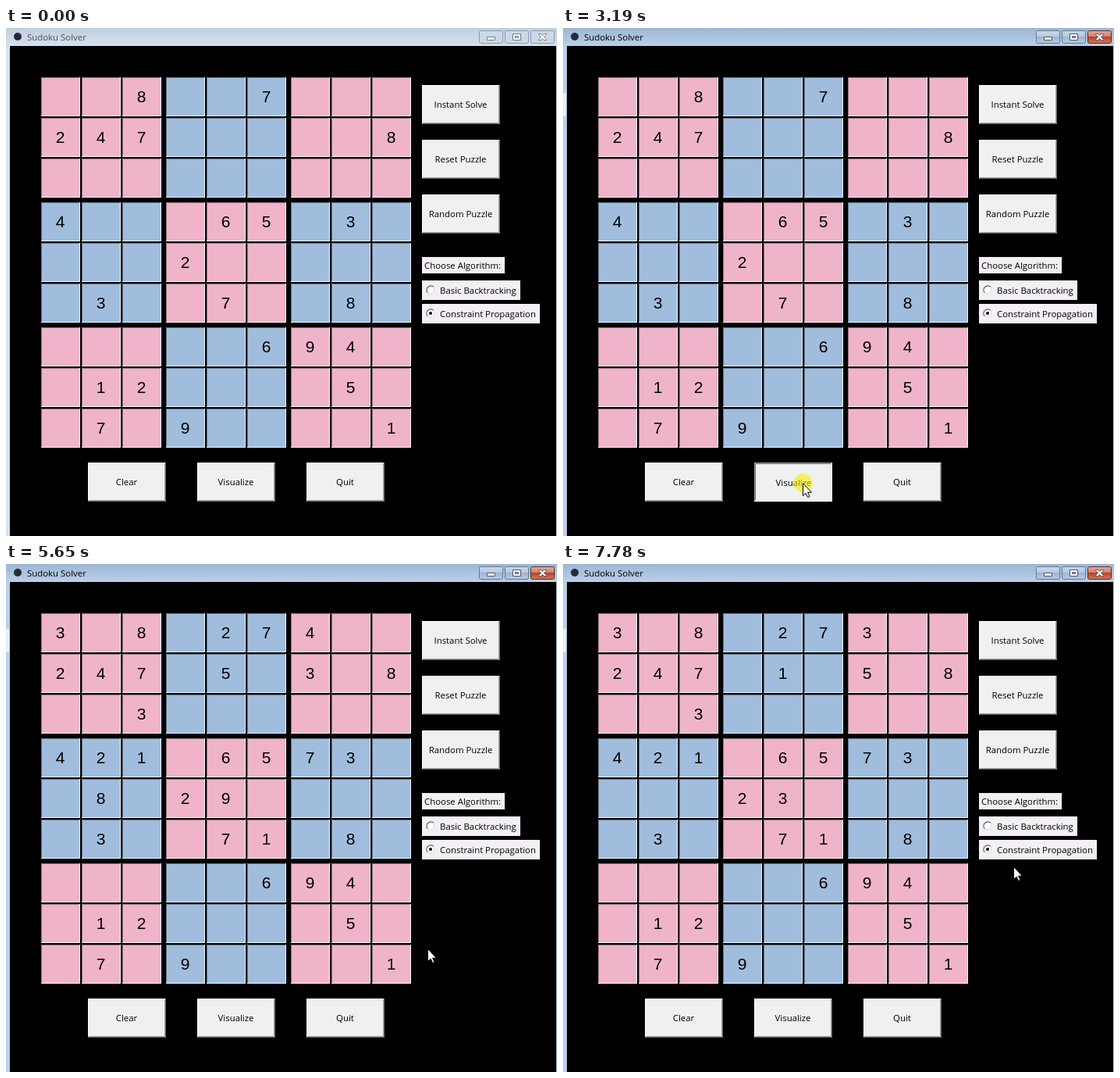
Animation of 706 by 650 pixels, one loop 8000 ms. Source, as an HTML page:

```html
<!DOCTYPE html>
<html lang="en">
<head>
<meta charset="utf-8">
<title>Sudoku Solver</title>
<style>
  html, body { margin: 0; width: 100%; height: 100%; overflow: hidden; background: #000; }
  svg { display: block; width: 706px; height: 650px; }
  text { font: 11.4px "Open Sans", "Noto Sans", sans-serif; }
  .digit { font: 21px "Liberation Sans", Arial, sans-serif; }
  .mid { text-anchor: middle; }
</style>
</head>
<body>
<svg id="stage" viewBox="0 0 706 650" xmlns="http://www.w3.org/2000/svg">
  <defs>
    <linearGradient id="idle" x2="0" y2="1">
      <stop stop-color="#c1cedb"/><stop offset="1" stop-color="#d5e1ee"/>
    </linearGradient>
    <linearGradient id="live" x2="0" y2="1">
      <stop stop-color="#9cb6d3"/><stop offset="1" stop-color="#b9d0e9"/>
    </linearGradient>
    <linearGradient id="glass" x2="0" y2="1">
      <stop stop-color="#c9d8ea"/><stop offset=".5" stop-color="#b4c8df"/>
      <stop offset=".5" stop-color="#9db5d1"/><stop offset="1" stop-color="#b5cbe4"/>
    </linearGradient>
    <linearGradient id="red" x2="0" y2="1">
      <stop stop-color="#e3aa9b"/><stop offset=".5" stop-color="#d07f69"/>
      <stop offset=".5" stop-color="#bb4227"/><stop offset="1" stop-color="#d0795c"/>
    </linearGradient>
  </defs>
</svg>
<script>
const LOOP = 8000, CLICK = 3190, RELEASE = 3270;
const PINK = ['#f0b4ca', '#906c79', '#fff6fc'];
const BLUE = ['#a1bddd', '#617185', '#e6f7ff'];
const FACE = '#f0f0f0', PANEL = '#f3eff5', SHADE = '#a0a0a0', DARK = '#696969';
const stage = document.getElementById('stage');

function add(tag, attrs, parent = stage) {
  const el = document.createElementNS('http://www.w3.org/2000/svg', tag);
  for (const k in attrs) el.setAttribute(k, attrs[k]);
  return parent.appendChild(el);
}
const rect = (x, y, width, height, fill, extra) =>
  add('rect', { x, y, width, height, fill, ...extra });
function label(x, y, str, cls = '') {
  const el = add('text', { x, y, class: cls });
  el.textContent = str;
  return el;
}
// One-pixel bevel: first colour on top and left, second on bottom and right.
function bevel(x, y, w, h, a, b, parent) {
  const edge = (d, stroke) => add('path', { d, stroke, fill: 'none' }, parent);
  edge(`M${x + .5} ${y + h}V${y + .5}H${x + w}`, a);
  edge(`M${x} ${y + h - .5}H${x + w - .5}V${y}`, b);
}

// Window frame
const frame = rect(0, 0, 706, 650);
const bar = rect(0, 0, 706, 23);
const tab = rect(0, 83, 4, 30, '#e6eff8');
rect(5, 23, 700, 627, '#000');
add('circle', { cx: 15, cy: 11, r: 5, fill: '#252b36' });
const title = label(27, 16, 'Sudoku Solver');
const boxes = [0, 1, 2].map(i => rect(606.5 + 33 * i, 3.5, 30, 16, 'none', { rx: 2 }));
const icons = [
  'M616.5 11.5h10v4h-10z',
  'M649.5 7.5h10v8h-10zM652.5 10.5h4v2h-4z',
  'M682.5 7.5h3l2 2 2-2h3v1l-3 3 3 3v1h-3l-2-2-2 2h-3v-1l3-3-3-3z'
].map(d => add('path', { d, fill: '#fff', 'fill-rule': 'evenodd' }));

// Puzzle grid
const START = [
  '  8  7   ', '247     8', '         ',
  '4   65 3 ', '   2     ', ' 3  7  8 ',
  '     694 ', ' 12    5 ', ' 7 9    1'
];
const block = i => Math.floor(i / 3);
const offset = i => 52 * i + 4 * block(i);
const cells = START.map((row, r) => [...row].map((digit, c) => {
  const x = 45 + offset(c), y = 63 + offset(r);
  const [face, dark, light] = (block(r) + block(c)) % 2 ? BLUE : PINK;
  rect(x, y, 50, 50, face);
  bevel(x, y, 50, 50, dark, light);
  return label(x + 24.5, y + 32, digit, 'digit mid');
}));

// Solver runs at a steady pace; each step writes row-column-digit, 0 clears.
const RUNS = [
  { start: 3580, pace: 160, steps: '223 001 003+225 226 005+223 003+226' },
  { start: 4610, pace: 80, steps: '229 223 321 551 367 042 163 064 145 449' },
  { start: 5490, pace: 160, steps: '312 418' },
  { start: 5880, pace: 390, steps: '149 065' },
  { start: 6500, pace: 160, steps: '145 410 141 165' },
  { start: 7380, pace: 320, steps: '443 063' }
];
function gridAt(t) {
  const grid = START.map(row => [...row]);
  for (const { start, pace, steps } of RUNS)
    steps.split(' ').forEach((step, i) => {
      if (t < start + i * pace) return;
      for (const [r, c, d] of step.split('+')) grid[r][c] = d === '0' ? ' ' : d;
    });
  return grid;
}

// Buttons and options
function button(x, y, str) {
  rect(x, y, 100, 50, FACE);
  const up = add('g', {}), down = add('g', { display: 'none' });
  bevel(x, y, 100, 50, '#fff', DARK, up);
  bevel(x + 1, y + 1, 98, 48, FACE, SHADE, up);
  bevel(x, y, 100, 50, SHADE, '#fff', down);
  bevel(x + 1, y + 1, 98, 48, DARK, FACE, down);
  return { up, down, text: label(x + 49.5, y + 29, str, 'mid') };
}
['Instant Solve', 'Reset Puzzle', 'Random Puzzle'].forEach((s, i) => button(533, 73 + 70 * i, s));
const [, visualize] = ['Clear', 'Visualize', 'Quit'].map((s, i) => button(105 + 140 * i, 556, s));

rect(533, 293, 106, 21, PANEL);
label(536, 308, 'Choose Algorithm:');
function radio(y, w, str, on) {
  rect(533, y, w, 25, PANEL);
  add('circle', { cx: 544, cy: y + 12, r: 5, fill: '#fff', stroke: '#d8d8d8' });
  add('path', {
    d: `M540.2 ${y + 15.8}A5.4 5.4 0 0 1 547.8 ${y + 8.2}`,
    fill: 'none', stroke: '#707070', 'stroke-width': 1.4
  });
  if (on) add('circle', { cx: 544, cy: y + 12, r: 2 });
  label(556, y + 17, str);
}
radio(323, 126, 'Basic Backtracking', false);
radio(353, 151, 'Constraint Propagation', true);

// Pointer
const glow = add('circle', { cx: 307.5, cy: 582, r: 12, fill: '#f8f000', opacity: .6 });
const pointer = add('path', {
  d: 'M.5 .5V16.5L4.2 13.2 6.7 18.5 9 17.5 6.6 12.2H11.5Z',
  fill: '#fff', stroke: '#000', 'stroke-linejoin': 'round'
});
const easeOut = p => u => 1 - (1 - u) ** p;
const easeInOut = u => u * u * (3 - 2 * u);
// Each stroke follows a cubic curve, redrawn in equal ticks.
const STROKES = [
  { start: 70, end: 1018, ticks: 12, ease: easeOut(1.7), curve: [[469, 636], [400, 570], [330, 551], [307, 582]] },
  { start: 4530, end: 5330, ticks: 10, ease: easeInOut, curve: [[307, 582], [380, 555], [470, 495], [540, 492]] },
  { start: 6420, end: 7300, ticks: 11, ease: easeOut(1.35), curve: [[540, 492], [640, 395], [676, 372], [571, 377]] },
  { start: 7620, end: 7780, ticks: 2, ease: u => u, curve: [[571, 377], [573, 380], [575, 384], [577, 387]] }
];
function pointerAt(t) {
  const { start, end, ticks, ease, curve } = STROKES.filter(s => s.start <= t).pop();
  const u = Math.min(1, (t - start) / (end - start));
  const k = ease(Math.floor(u * ticks + 1e-6) / ticks), q = 1 - k;
  const [a, b, c, d] = curve;
  return [0, 1].map(n => Math.round(
    q ** 3 * a[n] + 3 * q * q * k * b[n] + 3 * q * k * k * c[n] + k ** 3 * d[n]));
}

const show = (el, on) => el.setAttribute('display', on ? 'inline' : 'none');

function draw(t) {
  const live = t >= CLICK, pressed = live && t < RELEASE;
  frame.setAttribute('fill', live ? '#b9d1ea' : '#d5e2f0');
  bar.setAttribute('fill', live ? 'url(#live)' : 'url(#idle)');
  title.setAttribute('fill', live ? '#000' : '#4d5359');
  show(tab, live);
  boxes.forEach((b, i) => {
    b.setAttribute('fill', !live ? '#cbd8e6' : i === 2 ? 'url(#red)' : 'url(#glass)');
    b.setAttribute('stroke', !live ? '#8c9aab' : i === 2 ? '#5a2a25' : '#64788f');
  });
  icons.forEach(el => el.setAttribute('stroke', live ? '#535666' : '#747b85'));

  show(visualize.up, !pressed);
  show(visualize.down, pressed);
  visualize.text.setAttribute('transform', pressed ? 'translate(1 1)' : '');
  show(glow, pressed);

  gridAt(t).forEach((row, r) => row.forEach((d, c) => {
    if (cells[r][c].textContent !== d) cells[r][c].textContent = d;
  }));

  const inside = t >= STROKES[0].start;
  show(pointer, inside);
  if (inside) pointer.setAttribute('transform', `translate(${pointerAt(t)})`);
}

const began = performance.now();
function loop() {
  draw((performance.now() - began) % LOOP);
  requestAnimationFrame(loop);
}
loop();
</script>
</body>
</html>
```
